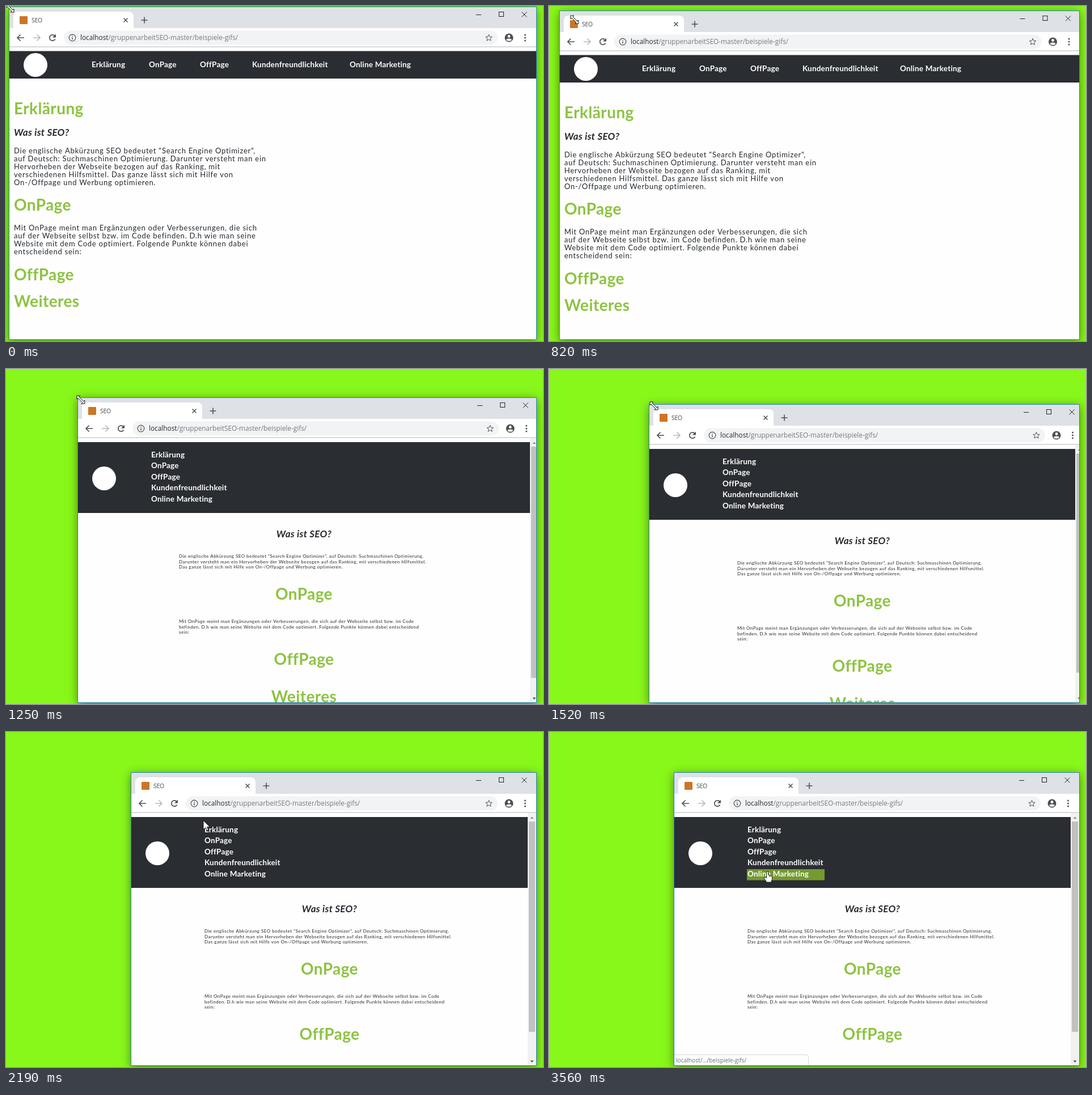
These frames come from a looping animation (947x591 px, 3820 ms). An HTML page with a canvas:

```html
<!DOCTYPE html>
<html lang="de">
<head>
<meta charset="utf-8">
<title>SEO</title>
<style>
  html, body { margin: 0; width: 100%; height: 100%; overflow: hidden; background: #88f71a; }
  canvas { display: block; }
</style>
</head>
<body>
<canvas id="stage" width="947" height="591"></canvas>
<script>
const ctx = document.getElementById('stage').getContext('2d');
const LOOP = 3820, RIGHT = 935, BOTTOM = 589;
const GREEN = '#8dc341', DARK = '#2a2d32', INK = '#24282d', ICON = '#4c5055';

// Bursts of screen updates: start, end, number of steps
const bursts = [[570, 1070, 9], [1130, 1630, 9], [1690, 2190, 10],
  [2240, 2720, 12], [2770, 3290, 10], [3340, 3400, 2], [3560, 3560, 1]];

// Time, window left, window top, lag of the right-hand controls, page right edge
const windowKeys = [[508, 6, 2, 0, 922], [820, 19, 9, 1.5, 922], [1070, 107, 46, 0, 922],
  [1505, 177, 63, 8, 928], [1630, 183, 64, 4, 928], [1800, 203, 67, 1, 928], [1950, 221, 72, 0, 920]];

// Time, pointer x, pointer y
const pointerKeys = [[508, 7, 4], [820, 45, 24], [1070, 111, 50], [1505, 185, 65],
  [1630, 191, 67], [1800, 217, 72], [1950, 227, 74], [2190, 348, 156], [2240, 352, 166],
  [2420, 366, 185], [2647, 379, 205], [2770, 382, 217], [2980, 383, 224], [3340, 385, 246]];

const links = ['Erklärung', 'OnPage', 'OffPage', 'Kundenfreundlichkeit', 'Online Marketing'];
const linkX = [145, 246, 336, 428, 600];
const hoverAt = [2240, 2420, 2647, 2980, 3320];

const wideIntro = [
  'Die englische Abkürzung SEO bedeutet "Search Engine Optimizer",',
  'auf Deutsch: Suchmaschinen Optimierung. Darunter versteht man ein',
  'Hervorheben der Webseite bezogen auf das Ranking, mit',
  'verschiedenen Hilfsmittel. Das ganze lässt sich mit Hilfe von',
  'On-/Offpage und Werbung optimieren.'];
const wideOnPage = [
  'Mit OnPage meint man Ergänzungen oder Verbesserungen, die sich',
  'auf der Webseite selbst bzw. im Code befinden. D.h wie man seine',
  'Website mit dem Code optimiert. Folgende Punkte können dabei',
  'entscheidend sein:'];
const slimIntro = [
  'Die englische Abkürzung SEO bedeutet "Search Engine Optimizer", auf Deutsch: Suchmaschinen Optimierung.',
  'Darunter versteht man ein Hervorheben der Webseite bezogen auf das Ranking, mit verschiedenen Hilfsmittel.',
  'Das ganze lässt sich mit Hilfe von On-/Offpage und Werbung optimieren.'];
const slimOnPage = [
  'Mit OnPage meint man Ergänzungen oder Verbesserungen, die sich auf der Webseite selbst bzw. im Code',
  'befinden. D.h wie man seine Website mit dem Code optimiert. Folgende Punkte können dabei entscheidend',
  'sein:'];

const fonts = {
  head: ['bold 28px Lato, sans-serif', '0.4px'],
  sub: ['italic bold 17px Lato, sans-serif', '0.3px'],
  nav: ['bold 13.5px Lato, sans-serif', '0.2px'],
  body: ['13px Lato, sans-serif', '0.75px'],
  small: ['8px Lato, sans-serif', '0.46px'],
  tab: ['10.5px "Open Sans", sans-serif', '-0.3px'],
  url: ['11.8px "Open Sans", sans-serif', '0px'],
  status: ['10.2px "Open Sans", sans-serif', '0px']
};

function steppedTime(t) {
  let s = 0;
  for (const [start, end, n] of bursts) {
    if (t < start) break;
    const gap = n > 1 ? (end - start) / (n - 1) : 1;
    s = start + Math.min(n - 1, Math.floor((t - start) / gap + 0.01)) * gap;
  }
  return s;
}

function sample(keys, t) {
  if (t <= keys[0][0]) return keys[0].slice(1);
  for (let i = 1; i < keys.length; i++) {
    const a = keys[i - 1], b = keys[i];
    if (t <= b[0]) {
      const u = (t - a[0]) / (b[0] - a[0]);
      return a.slice(1).map((v, j) => v + (b[j + 1] - v) * u);
    }
  }
  return keys[keys.length - 1].slice(1);
}

function smooth(t, start, length) {
  const u = Math.max(0, Math.min(1, (t - start) / length));
  return u * u * (3 - 2 * u);
}

function rect(x, y, w, h, color) {
  ctx.fillStyle = color;
  ctx.fillRect(x, y, w, h);
}

function round(x, y, w, h, r, color) {
  ctx.beginPath();
  ctx.roundRect(x, y, w, h, r);
  ctx.fillStyle = color;
  ctx.fill();
}

function disc(x, y, r, color) {
  ctx.beginPath();
  ctx.arc(x, y, r, 0, 7);
  ctx.fillStyle = color;
  ctx.fill();
}

function line(color, width, ...paths) {
  ctx.strokeStyle = color;
  ctx.lineWidth = width;
  ctx.beginPath();
  for (const p of paths)
    for (let i = 0; i < p.length; i += 2) i ? ctx.lineTo(p[i], p[i + 1]) : ctx.moveTo(p[i], p[i + 1]);
  ctx.stroke();
}

function shape(points, x, y, fill, stroke) {
  ctx.beginPath();
  for (let i = 0; i < points.length; i += 2) ctx.lineTo(x + points[i], y + points[i + 1]);
  ctx.closePath();
  ctx.fillStyle = fill;
  ctx.fill();
  if (stroke) {
    ctx.strokeStyle = stroke;
    ctx.lineWidth = 1;
    ctx.stroke();
  }
}

function text(str, x, y, style, color, align = 'left') {
  [ctx.font, ctx.letterSpacing] = fonts[style];
  ctx.textAlign = align;
  ctx.fillStyle = color;
  ctx.fillText(str, x, y);
}

function lines(list, x, y, pitch, style) {
  list.forEach((s, i) => text(s, x, y + i * pitch, style, INK));
}

function drawTabs(L, T, dx) {
  rect(L, T, RIGHT - L, 37, '#dee1e6');
  round(L + 7, T + 8, 212, 30, [8, 8, 0, 0], '#fff');
  round(L + 18, T + 16, 14, 14, 1, '#cc7527');
  text('SEO', L + 39, T + 27, 'tab', '#45494d');
  const x = L + 205, y = T + 23, p = L + 238;
  line(ICON, 1.5, [x - 3.5, y - 3.5, x + 3.5, y + 3.5], [x + 3.5, y - 3.5, x - 3.5, y + 3.5]);
  line(ICON, 1.6, [p - 5.5, y, p + 5.5, y], [p, y - 5.5, p, y + 5.5]);
  const c = 914 + dx, m = T + 13;
  line('#222', 1, [829 + dx, m + .5, 838 + dx, m + .5],
    [c - 4.5, m - 4.5, c + 4.5, m + 4.5], [c + 4.5, m - 4.5, c - 4.5, m + 4.5]);
  ctx.strokeRect(869.5 + dx, m - 4.5, 8, 8);
}

function drawArrow(x, y, dir, color) {
  line(color, 1.7, [x - 6 * dir, y, x + 6 * dir, y],
    [x + .5 * dir, y - 5.5, x + 6 * dir, y, x + .5 * dir, y + 5.5]);
}

function drawToolbar(L, T, dx) {
  const y = T + 54;
  rect(L, T + 37, RIGHT - L, 33, '#fff');
  drawArrow(L + 20, y, -1, ICON);
  drawArrow(L + 48, y, 1, '#b8babd');
  ctx.beginPath();
  ctx.arc(L + 76, y, 5.2, .5, 5.6);
  ctx.lineWidth = 1.7;
  ctx.strokeStyle = ICON;
  ctx.stroke();
  shape([6, -6, 6, 0, 0, 0], L + 76, y - .5, ICON);
  round(L + 96, y - 12.5, 765 - L + 6 - 6 + 0 + 6 + dx, 25, 12.5, '#f1f3f4');

  const i = L + 111;
  ctx.beginPath();
  ctx.arc(i, y, 5.8, 0, 7);
  ctx.lineWidth = 1.2;
  ctx.stroke();
  line(ICON, 1.4, [i, y - 3.2, i, y - 1.7], [i, y - .6, i, y + 3.2]);
  text('localhost', L + 125, y + 4, 'url', '#26292d');
  const host = ctx.measureText('localhost').width;
  text('/gruppenarbeitSEO-master/beispiele-gifs/', L + 125 + host, y + 4, 'url', '#777b80');

  const star = [];
  for (let k = 0; k < 10; k++) {
    const r = k % 2 ? 2.7 : 6, a = k * Math.PI / 5 - Math.PI / 2;
    star.push(r * Math.cos(a), r * Math.sin(a));
  }
  shape(star, 851.5 + dx, y + .3, '#f1f3f4', ICON);
  const ax = 887 + dx;
  disc(ax, y, 7.5, ICON);
  disc(ax, y - 2.5, 2.4, '#fff');
  ctx.beginPath();
  ctx.ellipse(ax, y + 3.6, 4.6, 2.2, 0, 0, 7);
  ctx.fill();
  for (const d of [-5, 0, 5]) disc(915.5 + dx, y + d, 1.5, ICON);
  rect(L, T + 69.5, RIGHT - L, 1, '#b4b6b8');
}

function drawWide(L, T) {
  rect(L, T + 77.5, RIGHT - L, 48.5, DARK);
  disc(L + 46, T + 102, 21, '#fff');
  links.forEach((s, i) => text(s, L + linkX[i], T + 106, 'nav', '#fff'));
  const x = L + 8;
  text('Erklärung', x, T + 189, 'head', GREEN);
  text('Was ist SEO?', x, T + 227, 'sub', INK);
  lines(wideIntro, x, T + 258, 14.1, 'body');
  text('OnPage', x, T + 359, 'head', GREEN);
  lines(wideOnPage, x, T + 394, 14.1, 'body');
  text('OffPage', x, T + 482, 'head', GREEN);
  text('Weiteres', x, T + 529, 'head', GREEN);
}

function drawSlim(L, T, pageR, t) {
  rect(L, T + 78, pageR - L, 125, DARK);
  disc(L + 46, T + 142, 21, '#fff');
  const active = hoverAt.filter(h => t >= h).length - 1;
  if (active >= 0) {
    ctx.globalAlpha = smooth(t, hoverAt[active], 340);
    rect(L + 128, T + 92 + 19.5 * active, 137, 19.5, '#89b830');
    ctx.globalAlpha = 1;
  }
  links.forEach((s, i) => text(s, L + 129, T + 105 + 19.4 * i, 'nav', '#fff'));
  const mid = (L + pageR) / 2, x = mid - 220.5;
  text('Was ist SEO?', mid, T + 246, 'sub', INK, 'center');
  lines(slimIntro, x, T + 282, 9.7, 'small');
  text('OnPage', mid, T + 356, 'head', GREEN, 'center');
  lines(slimOnPage, x, T + 397, 9.7, 'small');
  text('OffPage', mid, T + 470.5, 'head', GREEN, 'center');
  text('Weiteres', mid, T + 537, 'head', GREEN, 'center');
  drawScrollbar(T, pageR);
}

function drawScrollbar(T, x) {
  const top = T + 71, track = 573 - (T + 86);
  rect(x, top, 15, BOTTOM - top, '#f1f1f1');
  rect(x + 2, T + 86, 11, track * (BOTTOM - top) / 499, '#c1c1c1');
  shape([-3, 2, 3, 2, 0, -1.5], x + 7.5, T + 79, '#8b8b8b');
  shape([-3, -1.5, 3, -1.5, 0, 2], x + 7.5, 581, '#505050');
}

function drawStatus(L, t) {
  ctx.globalAlpha = smooth(t, 3200, 200);
  round(L - 2, 569.5, 238.5, 24, [0, 4, 0, 0], '#fff');
  ctx.strokeStyle = '#d4d6d8';
  ctx.lineWidth = 1;
  ctx.stroke();
  text('localhost/.../beispiele-gifs/', L + 3, 583, 'status', '#6a6e72');
  ctx.globalAlpha = 1;
}

function drawPointer(t) {
  const [x, y] = sample(pointerKeys, t);
  ctx.lineJoin = 'round';
  if (t < 1950) {
    shape([-7, -7, -1, -7, -3, -5, 5, 3, 7, 1, 7, 7, 1, 7, 3, 5, -5, -3, -7, -1], x, y, '#fff', '#111');
  } else if (t < 2240) {
    shape([0, 0, 0, 16, 4, 12.5, 6.5, 18, 9, 17, 6.5, 11.5, 11.5, 11.5], x, y, '#fff', '#111');
  } else {
    shape([-1.5, 0, 1.5, 0, 1.5, 6, 7, 7.5, 8.5, 9, 8.5, 14, 6.5, 19, -1, 19,
      -5.5, 12, -5.5, 10, -3.5, 10, -1.5, 12], x, y, '#fff', '#222');
    line('#222', .8, [3.5 + x, y + 7, 3.5 + x, y + 10], [6 + x, y + 7.5, 6 + x, y + 10]);
  }
  ctx.lineJoin = 'miter';
}

function draw(t) {
  const [L, T, dx, pageR] = sample(windowKeys, t).map((v, i) => i === 2 ? v : Math.round(v));
  rect(0, 0, 947, 591, '#88f71a');

  ctx.save();
  ctx.shadowColor = 'rgba(0,0,0,.5)';
  ctx.shadowBlur = 16;
  ctx.shadowOffsetY = 3;
  rect(L, T, RIGHT - L, BOTTOM - T, '#fff');
  ctx.restore();

  ctx.save();
  ctx.beginPath();
  ctx.rect(L, T, RIGHT - L, BOTTOM - T);
  ctx.clip();
  rect(L, T, RIGHT - L, BOTTOM - T, '#fefefe');
  drawTabs(L, T, dx);
  drawToolbar(L, T, dx);
  if (L < 60) drawWide(L, T);
  else drawSlim(L, T, pageR, t);
  if (t > 3200) drawStatus(L, t);
  ctx.restore();

  ctx.strokeStyle = '#2383c9';
  ctx.lineWidth = 1;
  ctx.strokeRect(L - .5, T - .5, RIGHT - L + 1, BOTTOM - T);
  drawPointer(t);
}

const began = performance.now();
function tick() {
  draw(steppedTime((performance.now() - began) % LOOP));
  requestAnimationFrame(tick);
}
tick();
</script>
</body>
</html>
```
